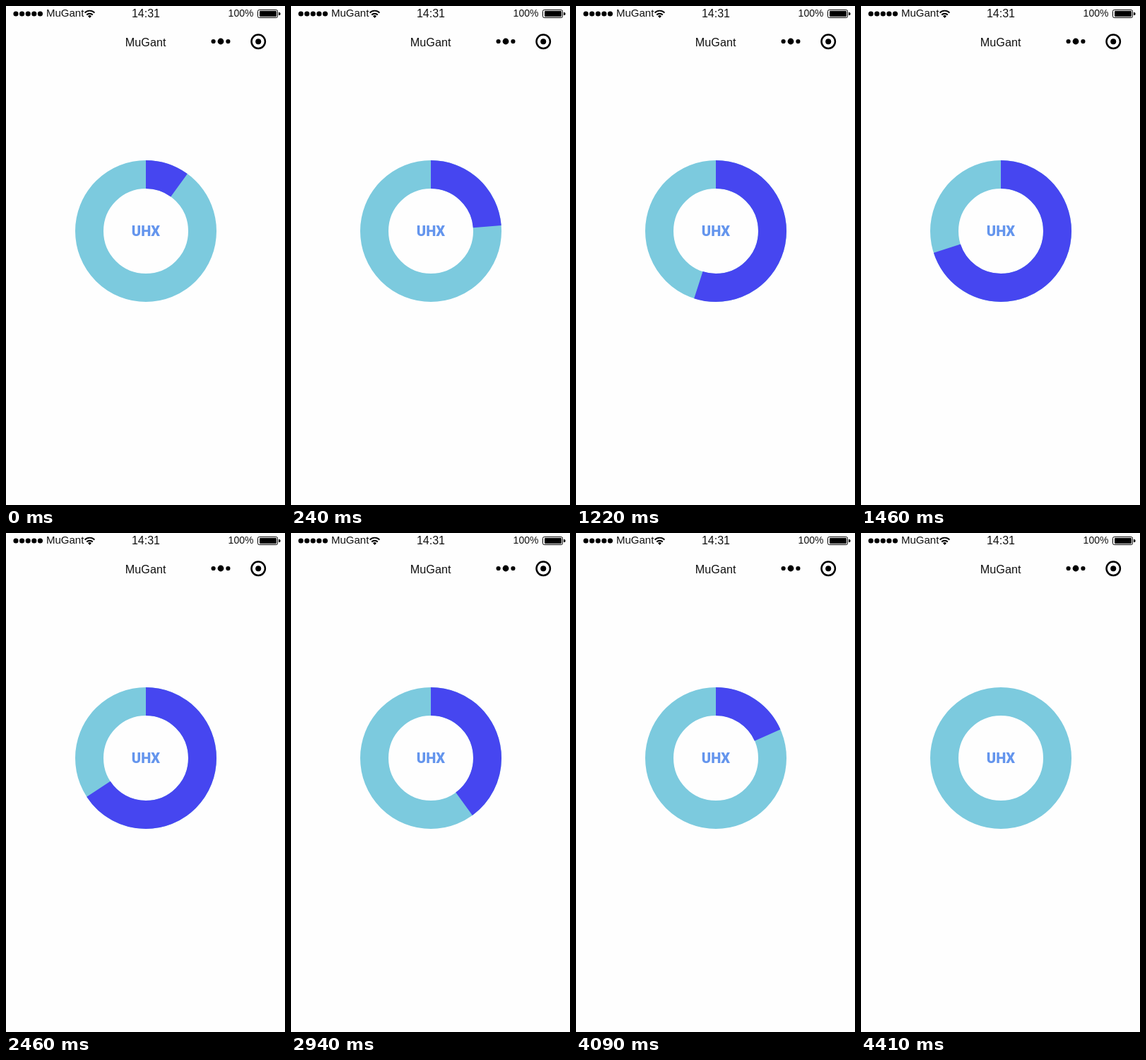
These frames come from a looping animation (395 px wide and 705 px high, 4990 ms). An HTML page:

```html
<!DOCTYPE html>
<html lang="en">
<head>
<meta charset="utf-8">
<title>Ring progress</title>
<style>
  html, body {
    margin: 0;
    width: 100%;
    height: 100%;
    overflow: hidden;
    background: #fefefe;
  }
  svg { display: block; }
  text { font-family: "Liberation Sans", Arial, sans-serif; fill: #111; }
  .mid { text-anchor: middle; }
  .label {
    font: 800 20px Roboto, "Liberation Sans", sans-serif;
    fill: #6495ed;
  }
  .ring { fill: none; stroke: #7ccade; stroke-width: 40; }
  .bar {
    stroke: #4646f0;
    animation: fill 4990ms -1ms infinite step-end;
  }
  /* dash length = percent of the ring, advanced every 80 ms */
  @keyframes fill {
    0%       { stroke-dasharray: 10 200; animation-timing-function: steps(6, end); }
    9.6192%  { stroke-dasharray: 37.4 200; }
    11.2224% { stroke-dasharray: 40 200; }
    22.8456% { stroke-dasharray: 50 200; animation-timing-function: steps(4, end); }
    29.2585% { stroke-dasharray: 70 200; }
    49.2985% { stroke-dasharray: 65.8 200; animation-timing-function: steps(5, end); }
    57.3146% { stroke-dasharray: 43 200; }
    58.9178% { stroke-dasharray: 40 200; }
    75.5511% { stroke-dasharray: 36.7 200; animation-timing-function: steps(8, end); }
    88.3767%, 100% { stroke-dasharray: 0 200; }
  }
</style>
</head>
<body>
<svg width="395" height="705" viewBox="0 0 395 705">
  <!-- status bar -->
  <g>
    <circle cx="14" cy="11" r="3.6"/>
    <circle cx="22.6" cy="11" r="3.6"/>
    <circle cx="31.2" cy="11" r="3.6"/>
    <circle cx="39.8" cy="11" r="3.6"/>
    <circle cx="48.4" cy="11" r="3.6"/>
  </g>
  <text x="57" y="15" font-size="15">MuGant</text>
  <g fill="none" stroke="#000" stroke-width="1.9">
    <path d="M111.6 9.6a9.6 9.6 0 0 1 13.8 0"/>
    <path d="M114.2 12.5a6 6 0 0 1 8.6 0"/>
    <path d="M116 14.2a3.6 3.6 0 0 1 5 0L118.5 17z" fill="#000" stroke="none"/>
  </g>
  <text class="mid" x="198" y="16" font-size="16">14:31</text>
  <text x="314.6" y="15" font-size="14">100%</text>
  <rect x="356.5" y="5.5" width="28" height="11" rx="2" fill="none" stroke="#000"/>
  <rect x="359" y="7" width="24" height="8" rx="1"/>
  <path d="M386 9h1a1.5 1.5 0 0 1 1.5 1.5v1a1.5 1.5 0 0 1-1.5 1.5h-1z"/>

  <!-- title bar -->
  <text class="mid" x="197.6" y="57" font-size="16.2">MuGant</text>
  <circle cx="293.6" cy="50" r="3.1"/>
  <circle cx="304" cy="50" r="4.4"/>
  <circle cx="314.4" cy="50" r="3.1"/>
  <circle cx="357.2" cy="50.3" r="9.7" fill="none" stroke="#000" stroke-width="2.5"/>
  <circle cx="357.2" cy="50.3" r="4"/>

  <!-- progress ring -->
  <circle class="ring" cx="198" cy="318" r="80"/>
  <circle class="ring bar" cx="198" cy="318" r="80" pathLength="100" transform="rotate(-90 198 318)"/>
  <text class="mid label" x="198" y="325">UHX</text>
</svg>
</body>
</html>
```
